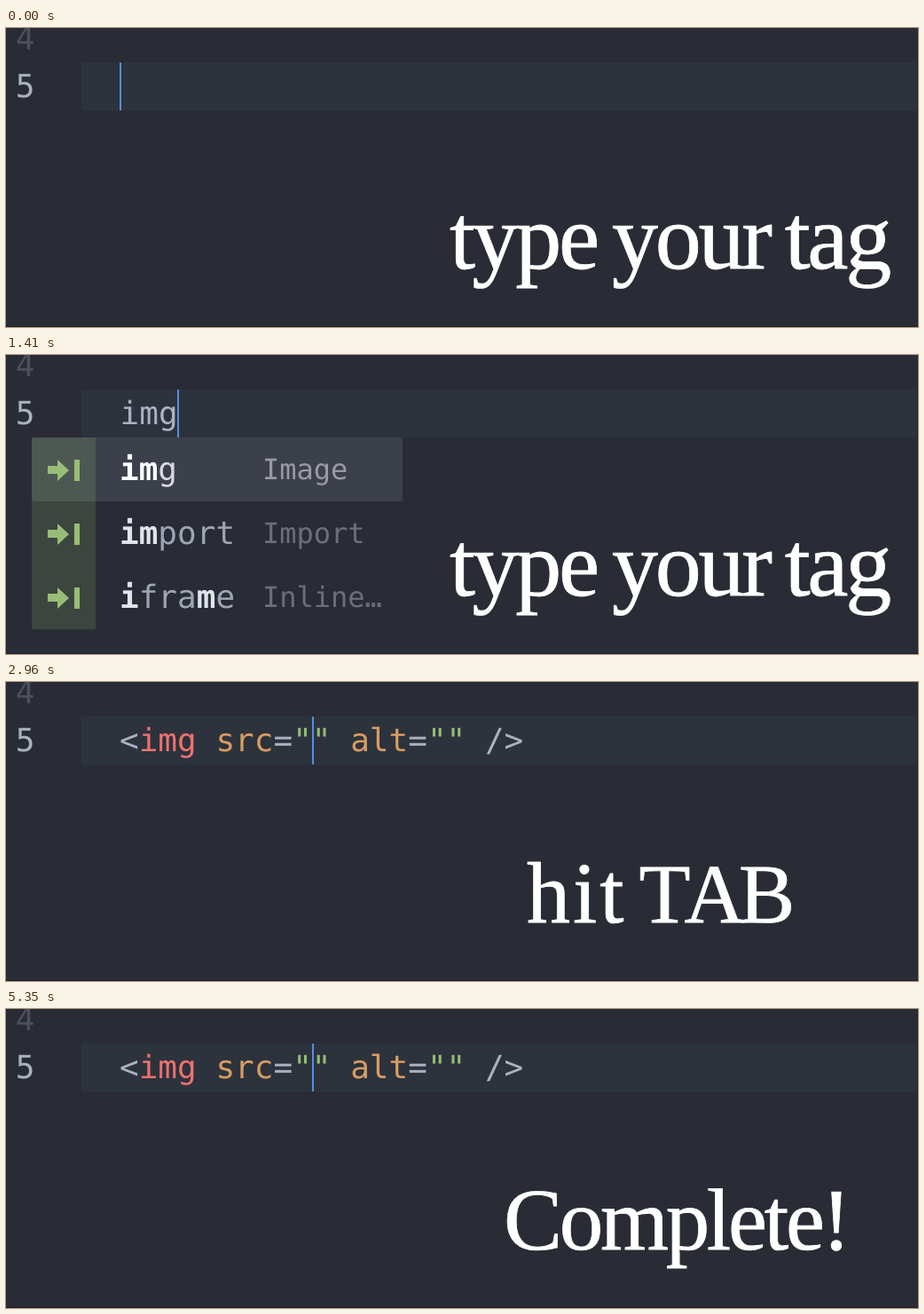
An HTML page for the animation above (5.38 s loop, 1028 px wide and 337 px high).

```html
<!DOCTYPE html>
<html lang="en">
<head>
<meta charset="utf-8">
<title>Tag completion</title>
<style>
  html, body { margin: 0; width: 100%; height: 100%; overflow: hidden; background: #2a2c35; }
  svg { display: block; width: 1028px; height: 337px; }
  text { white-space: pre; text-rendering: geometricPrecision; }

  .code { font: 36px "DejaVu Sans Mono", monospace; fill: #abb2bf; }
  .name { fill: #f0716f; }
  .attr { fill: #d99c62; }
  .string { fill: #95bd76; }

  .word { font: 36px "DejaVu Sans Mono", monospace; fill: #9da5b4; }
  .word .hit { font-weight: bold; fill: #dfe3ea; }
  .hint { font: 32px "DejaVu Sans Mono", monospace; fill: #6b6f7a; }
  .selected .word { fill: #d7dae0; }
  .selected .word .hit { fill: #fff; }
  .selected .hint { fill: #999ba1; }

  .caption {
    font-family: "Liberation Serif", serif; font-kerning: none;
    fill: #fff; stroke: #fff; stroke-width: .8px;
  }

  .timed { animation: 5380ms step-end infinite; }
  #key-i { animation-name: key-i; }
  #key-m { animation-name: key-m; }
  #key-g { animation-name: key-g; }
  #tag { animation-name: tag; }
  #list-i { animation-name: list-i; }
  #list-im { animation-name: list-im; }
  #list-img { animation-name: list-img; }
  #say-type { animation-name: say-type; }
  #say-tab { animation-name: say-tab; }
  #say-done { animation-name: say-done; }
  #cursor { animation-name: advance, blink; }

  @keyframes key-i { 0%, 46.468% { opacity: 0 } 6.134% { opacity: 1 } 100% { opacity: 0 } }
  @keyframes key-m { 0%, 46.468% { opacity: 0 } 15.613% { opacity: 1 } 100% { opacity: 0 } }
  @keyframes key-g { 0%, 46.468% { opacity: 0 } 25.093% { opacity: 1 } 100% { opacity: 0 } }
  @keyframes tag { 0% { opacity: 0 } 46.468%, 100% { opacity: 1 } }

  @keyframes list-i { 0%, 17.844%, 100% { opacity: 0 } 8.364% { opacity: 1 } }
  @keyframes list-im { 0%, 27.323%, 100% { opacity: 0 } 17.844% { opacity: 1 } }
  @keyframes list-img { 0%, 46.468%, 100% { opacity: 0 } 27.323% { opacity: 1 } }

  @keyframes say-type { 0% { opacity: 1 } 28.996%, 100% { opacity: 0 } }
  @keyframes say-tab { 0%, 66.171%, 100% { opacity: 0 } 28.996% { opacity: 1 } }
  @keyframes say-done { 0% { opacity: 0 } 66.171%, 100% { opacity: 1 } }

  @keyframes advance {
    0% { transform: translateX(0) }
    6.134% { transform: translateX(22px) }
    15.613% { transform: translateX(43px) }
    25.093% { transform: translateX(65px) }
    46.468%, 100% { transform: translateX(217px) }
  }
  @keyframes blink {
    0%, 46.468%, 70.26%, 94.052%, 100% { opacity: 1 }
    37.732%, 58.364%, 82.156% { opacity: 0 }
  }
</style>
</head>
<body>
<svg viewBox="0 0 1028 337">
  <defs>
    <path id="arrow" fill="#98bd76" d="M47 32H58V25L71 37L58 49V41H47ZM77 25H83V49H77Z"/>
  </defs>

  <rect width="1028" height="337" fill="#2a2c35"/>
  <rect x="85" y="39" width="941" height="54" fill="#2c333c"/>
  <text class="code" x="10.8" y="24" style="fill:#4b505e">4</text>
  <text class="code" x="10.8" y="78">5</text>

  <g class="code">
    <text id="key-i" class="timed" x="128.5" y="78">i</text>
    <text id="key-m" class="timed" x="150.2" y="78">m</text>
    <text id="key-g" class="timed" x="171.9" y="78">g</text>
    <text id="tag" class="timed" x="128" y="78">&lt;<tspan class="name">img</tspan> <tspan class="attr">src</tspan>=<tspan class="string">""</tspan> <tspan class="attr">alt</tspan>=<tspan class="string">""</tspan> /&gt;</text>
  </g>
  <rect id="cursor" class="timed" x="128" y="39" width="2" height="54" fill="#568dea"/>

  <g id="list-i" class="timed list"></g>
  <g id="list-im" class="timed list"></g>
  <g id="list-img" class="timed list"></g>

  <text id="say-type" class="timed caption" x="500" y="271" font-size="104" letter-spacing="-3.3" word-spacing="-5.5">type your tag</text>
  <g id="say-tab" class="timed caption">
    <text x="587" y="271" font-size="98" letter-spacing="3">hit</text>
    <text x="713.4" y="271" font-size="95" letter-spacing="-7">TAB</text>
  </g>
  <text id="say-done" class="timed caption" x="561" y="271" font-size="99" letter-spacing="-3.3">Complete!</text>

  <rect y="336" width="1028" height="1" fill="#231e2b"/>
</svg>
<script>
  const ROW = 72;

  // Asterisks enclose the matched letters.
  const mark = word => word.replace(/\*(\w+)\*/g, '<tspan class="hit">$1</tspan>');

  function row([word, hint], index, width, hintX) {
    const selected = index === 0;
    const panel = selected ? `<rect x="29" width="${width}" height="${ROW}" rx="3" fill="#3c404b"/>` : '';
    return `<g class="${selected ? 'selected' : ''}" transform="translate(0 ${93 + ROW * index})">
      ${panel}
      <path d="M32 0H101V72H32Q29 72 29 69V3Q29 0 32 0Z" fill="${selected ? '#4d5852' : '#3c463f'}"/>
      ${selected ? '' : '<path d="M29 0H35V72H29Z" fill="#3c463f"/>'}
      <use href="#arrow"/>
      <text class="word" x="128" y="48">${mark(word)}</text>
      <text class="hint" x="${hintX}" y="47">${hint}</text>
    </g>`;
  }

  function fillList(id, width, hintX, rows, extra = '') {
    document.getElementById(id).innerHTML =
      `<rect x="29" y="93" width="${width}" height="${ROW * rows.length}" rx="3" fill="#2a2c35"/>` +
      rows.map((entry, i) => row(entry, i, width, hintX)).join('') + extra;
  }

  fillList('list-i', 408, 285, [
    ['*i*', 'Italic'], ['*i*dea', 'idea'], ['*i*mg', 'Image'], ['*i*frame', 'Inline…']
  ], '<rect x="440" y="96" width="4" height="150" rx="2" fill="#3c404b"/>');
  fillList('list-im', 418, 289, [
    ['*im*g', 'Image'], ['*im*port', 'Import'], ['*i*fra*m*e', 'Inline…']
  ]);
  fillList('list-img', 325, 223, [['*img*', 'Image']]);
</script>
</body>
</html>
```
